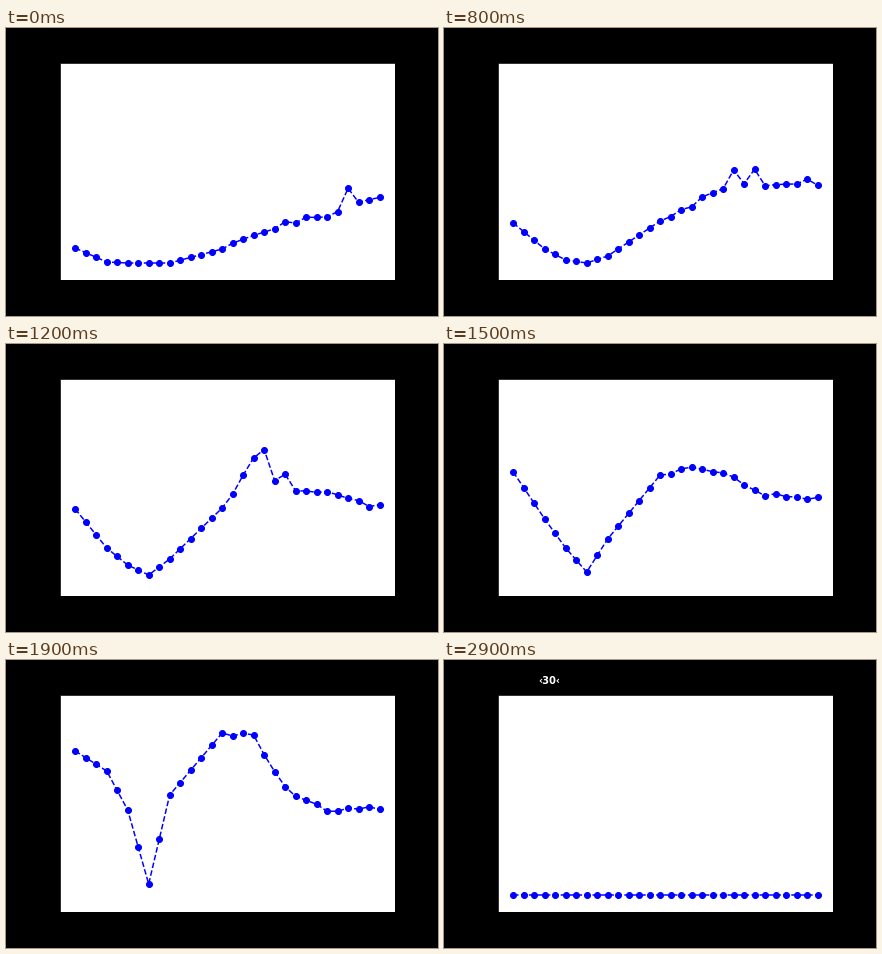
Write a matplotlib script that moves like this. It is 432 px wide and 288 px high and loops after 3 s.

```python
import numpy as np
import matplotlib.pyplot as plt
from matplotlib.animation import FuncAnimation

W, H, DPI = 432, 288, 72
FRAMES, INTERVAL = 30, 100
N = 30
TOP, BOTTOM = 34.56, 252
ZERO = 235.2          # zero level, in pixels from the top

idx = np.arange(N)

# A few points of the trend at moments of the loop, in pixels from the top.
KNOTS = [0, 3, 5, 7, 9, 14, 17, 20, 24, 29]
TREND = {
    0: [220, 234, 235, 235, 235, 221, 208, 194, 187, 169],
    8: [195, 221, 232, 235, 228, 193, 176, 160, 158, 154],
    12: [165, 204, 221, 231, 215, 164, 112, 147, 149, 164],
    15: [128, 175, 204, 228, 195, 131, 120, 132, 149, 158],
    19: [91, 111, 150, 224, 135, 73, 77, 128, 152, 150],
}
SPIKE = 18
SPIKE_END = 14        # first frame without spikes

times = list(TREND)
poses = [np.interp(idx, KNOTS, points) for points in TREND.values()]

# The trend goes on, the ends drop, then the rest sinks to zero.
late = np.clip(poses[-1] + 0.3 * (poses[-1] - poses[-2]), 60, ZERO)
arch = np.clip(np.sin(np.pi * idx / 28), 0, 1)
times += [23, 24, 29]
poses += [late, ZERO + (late - ZERO) * arch, np.full(N, ZERO)]
poses = np.array(poses)


def heights(frame):
    y = np.array([np.interp(frame, times, column) for column in poses.T])
    if frame < SPIKE_END:
        # Two spikes wander to the left at their own speeds.
        for spot in (round(25.6 - 0.63 * frame), round(30.5 - 0.9 * frame)):
            if spot < N:
                y[spot] -= SPIKE
    if frame < 24:
        rng = np.random.default_rng(frame)
        y += rng.normal(0, 2, N) * (idx > 14)
    return y


fig = plt.figure(figsize=(W / DPI, H / DPI), dpi=DPI, facecolor="black")
ax = fig.add_axes([0.125, 0.125, 0.775, 0.755])
ax.set(xlim=(-1.45, 30.45), ylim=(BOTTOM, TOP), xticks=[], yticks=[])
line, = ax.plot(idx, heights(0), "o--", color="#0000ff", lw=1.5, ms=6)

# Counter above the axes, only at the end of the loop.
counter = fig.text(94 / W, 1 - 24 / H, "‹30‹", color="white", size=10,
                   weight="bold", family="DejaVu Sans", va="baseline")


def update(frame):
    line.set_ydata(heights(frame))
    counter.set_visible(frame == FRAMES - 1)
    return line, counter


anim = FuncAnimation(fig, update, frames=FRAMES, interval=INTERVAL,
                     repeat=True, repeat_delay=0)
plt.show()
```
